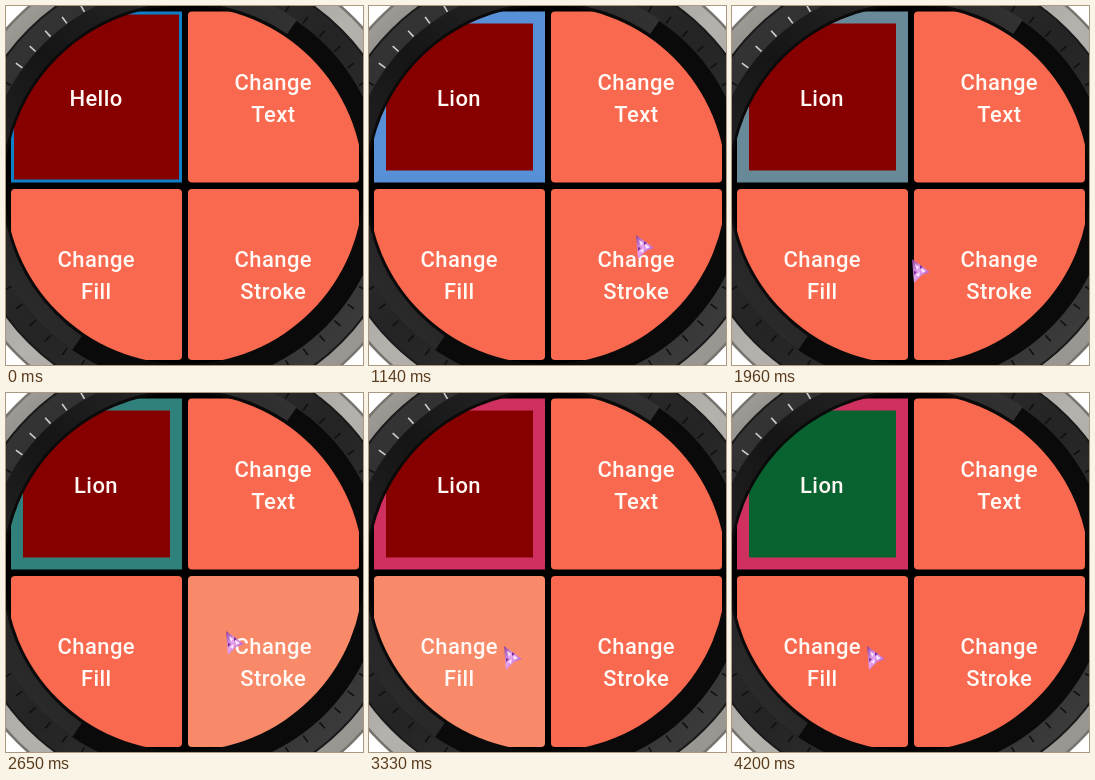
These frames come from a looping animation (357x359 px, 4390 ms). An HTML page:

```html
<!DOCTYPE html>
<html lang="en">
<head>
<meta charset="utf-8">
<title>Watch buttons</title>
<style>
  html, body { margin: 0; width: 100%; height: 100%; overflow: hidden; background: #000; }
  svg { display: block; width: 100vw; height: 100vh; }
  text { font: 500 22px Roboto, sans-serif; letter-spacing: .4px; fill: #fff8f4; text-anchor: middle; }
  .button { fill: #f9694f; }
  .button.pressed { fill: #f88a69; }
</style>
</head>
<body>
<svg viewBox="0 0 357 359">
  <defs>
    <clipPath id="screen"><circle cx="178.2" cy="178.8" r="179.3"/></clipPath>
    <linearGradient id="metal" x2="1" y2="1">
      <stop offset="0" stop-color="#bdbab5"/>
      <stop offset=".2" stop-color="#8e8b86"/>
      <stop offset=".5" stop-color="#b5b2ad"/>
      <stop offset="1" stop-color="#8e8b86"/>
    </linearGradient>
    <linearGradient id="bezel" x2="1" y2="1">
      <stop offset="0" stop-color="#3a3a3a"/>
      <stop offset=".5" stop-color="#242424"/>
      <stop offset="1" stop-color="#444"/>
    </linearGradient>
    <linearGradient id="sheen" y1="1" x2="1" y2="0">
      <stop offset="0" stop-color="#303030"/>
      <stop offset=".5" stop-color="#151515"/>
      <stop offset="1" stop-color="#343434"/>
    </linearGradient>
    <linearGradient id="gem" x2="1" y2=".8">
      <stop offset="0" stop-color="#8a3a9a"/>
      <stop offset=".45" stop-color="#e6a4ef"/>
      <stop offset="1" stop-color="#ae4ec0"/>
    </linearGradient>
  </defs>

  <rect width="357" height="359" fill="#fff"/>
  <circle cx="179" cy="180" r="230" fill="none" stroke="#77746f" stroke-width="18"/>
  <circle cx="179" cy="180" r="229" fill="none" stroke="url(#metal)" stroke-width="15"/>
  <circle cx="179" cy="180" r="221" fill="url(#bezel)" stroke="#1a1a1a" stroke-width="2"/>
  <g id="ticks" stroke-width="1.6"></g>
  <circle cx="179" cy="180" r="199" fill="#0a0a0a"/>
  <path d="M71 337A191 191 0 0 1 286 21" fill="none" stroke="url(#sheen)" stroke-width="17"/>

  <g clip-path="url(#screen)">
    <rect width="357" height="359"/>
    <rect id="card"/>
    <g id="buttons"></g>
    <text id="word" x="90" y="99.5"></text>
  </g>

  <g id="cursor">
    <path d="M0 0L18 13L10 16L2 24Z" fill="url(#gem)"/>
    <path d="M3 5l4 3-2 3zM9 9l5 3-4 2zM4 16l4-3-1 5z" fill="#fbe6fd"/>
    <path d="M2 12l3 1-3 3zM8 6l3 2-3 2z" fill="#7a2f9c"/>
  </g>
</svg>

<script>
const LOOP = 4390;
const byId = id => document.getElementById(id);

function add(parent, tag, attributes, content = "") {
  const node = document.createElementNS("http://www.w3.org/2000/svg", tag);
  for (const key in attributes) node.setAttribute(key, attributes[key]);
  node.textContent = content;
  parent.append(node);
  return node;
}

// Minute marks catch the light only at the top left.
for (let angle = 0; angle < 360; angle += 6) {
  const lit = angle > 210 && angle < 245;
  add(byId("ticks"), "path", { d: "M201 0h8", stroke: lit ? "#d0d0d0" : "#101010",
    transform: `translate(179 180) rotate(${angle})` });
}

function addButton(x, y, label, baseline) {
  const rect = add(byId("buttons"), "rect", { x, y, width: 171, height: 171, rx: 4, class: "button" });
  ["Change", label].forEach((line, i) =>
    add(byId("buttons"), "text", { x: x + 85.3, y: baseline + 32 * i }, line));
  return rect;
}
const buttons = {
  text: addButton(182, 5.5, "Text", 84),
  fill: addButton(5, 183, "Fill", 261),
  stroke: addButton(182, 183, "Stroke", 261)
};

// Each step overrides part of the state and holds until the next one.
const start = { word: "Hello", fill: "#870000", stroke: "#0f80c8", width: 3, pressed: "", cursor: null };
const move = (time, x, y) => [time, { cursor: [x, y] }];
const press = (time, pressed) => [time, { pressed }];
const release = (time, change) => [time, { pressed: "", ...change }];

const steps = [
  move(50, 318, 96), move(120, 294, 102), move(190, 273, 106), move(260, 262, 107),
  press(330, "text"), release(400, { word: "Dolphin" }),
  press(510, "text"), release(580, { word: "Lion" }), move(630, 264, 109),
  move(770, 266, 135), move(840, 267, 175), move(910, 267, 211), move(970, 267, 229),
  press(1040, "stroke"), release(1140, { stroke: "#5890d8", width: 12 }),
  press(1260, "stroke"), release(1390, { stroke: "#708fb8" }),
  press(1460, "stroke"), release(1590, { stroke: "#6c8ca8" }),
  [1640, { stroke: "#688a98" }],
  move(1840, 248, 238), move(1900, 214, 247), move(1960, 180, 253),
  move(2030, 200, 246), move(2150, 220, 238),
  [2220, { stroke: "#50858a" }], [2470, { stroke: "#30807c" }],
  press(2650, "stroke"), release(2720, { stroke: "#80586e" }),
  press(2900, "stroke"), release(3030, { stroke: "#d03060" }),
  move(3230, 180, 247), move(3280, 135, 253),
  press(3330, "fill"), release(3460, { fill: "#662012" }),
  press(3590, "fill"), release(3660, { fill: "#46381c" }),
  press(3840, "fill"), release(3890, { fill: "#284e26" }),
  press(4130, "fill"), release(4200, { fill: "#086330" })
];

function draw(state) {
  const { width, cursor } = state;
  const card = { x: 5 + width / 2, y: 5.5 + width / 2, width: 171 - width, height: 171 - width,
    fill: state.fill, stroke: state.stroke, "stroke-width": width };
  for (const key in card) byId("card").setAttribute(key, card[key]);
  byId("word").textContent = state.word;
  for (const name in buttons) buttons[name].classList.toggle("pressed", state.pressed === name);
  byId("cursor").setAttribute("visibility", cursor ? "visible" : "hidden");
  if (cursor) byId("cursor").setAttribute("transform", `translate(${cursor})`);
}

function frame() {
  const time = performance.now() % LOOP;
  const past = steps.filter(([at]) => at <= time).map(([, change]) => change);
  draw(Object.assign({}, start, ...past));
  requestAnimationFrame(frame);
}
frame();
</script>
</body>
</html>
```
